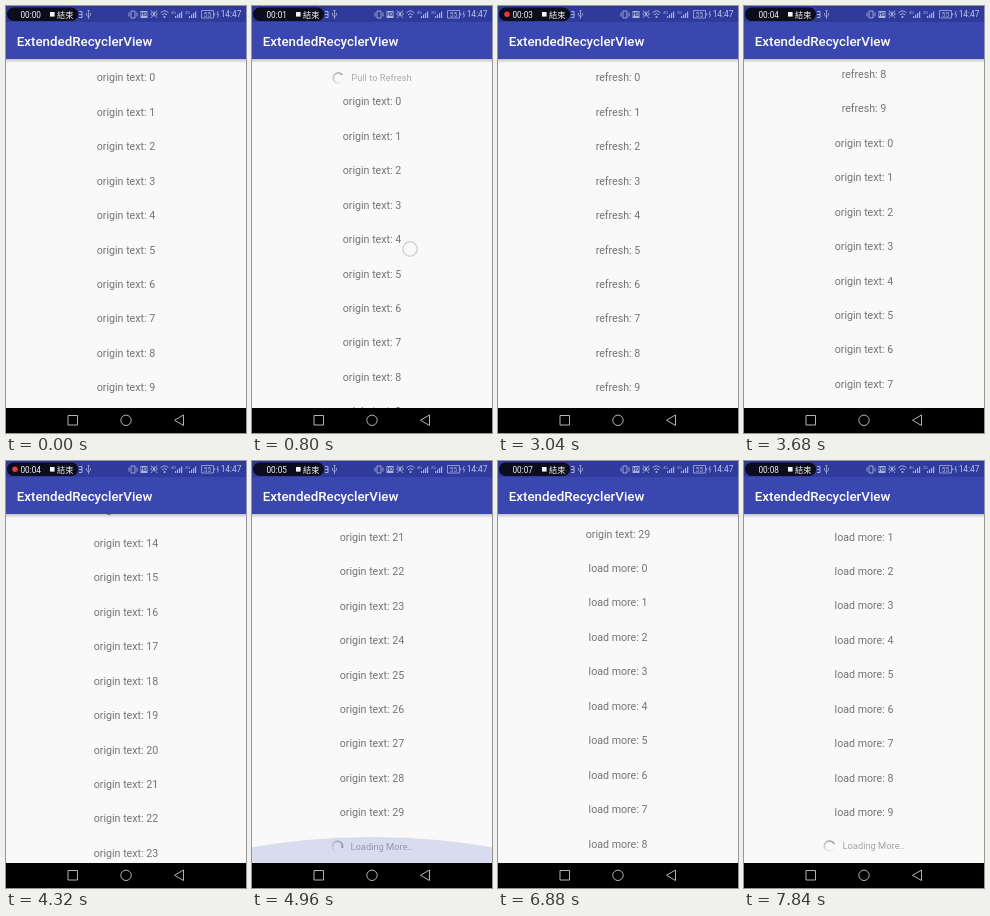
An HTML page with a canvas that plays this animation: 240x427 px, repeating every 8 s.

```html
<!DOCTYPE html>
<html lang="en">
<head>
<meta charset="utf-8">
<title>ExtendedRecyclerView</title>
<style>
  html, body { margin: 0; width: 100%; height: 100%; overflow: hidden; background: #f9f9f9; }
  canvas { display: block; width: 100vw; height: 100vh; }
</style>
</head>
<body>
<canvas></canvas>
<script>
const W = 240, H = 427, LOOP = 8000, STEP = 160;
const TOP = 71.5, PITCH = 34.44, LIST_TOP = 53, LIST_BOTTOM = 402;
const RELEASED = 1400, REFRESHED = 2560, LOADED = 6240;
const ICON = '#aab0dc';

// Time and y of the row "origin text: 0"
const scrollKeys = [
  [0, 71.5], [320, 72], [480, 78], [800, 95.5], [1120, 121], [1280, 121], [1440, 108],
  [2559, 108], [2560, 452.4], [2720, 424], [2880, 415.9], [3200, 415.9], [3360, 355],
  [3680, 137], [4000, -160], [4320, -400], [4640, -602], [4800, -647.3],
  [6400, -647.3], [6560, -720], [6880, -926], [7200, -991.9], [LOOP, -991.9]
];
const glowKeys = [
  [4640, 0], [4800, 0.9], [4960, 1], [5120, 0.75], [5440, 0],
  [7040, 0], [7200, 0.8], [7360, 0.7], [7680, 0], [LOOP, 0]
];

const canvas = document.querySelector('canvas');
const ctx = canvas.getContext('2d');

function sample(keys, t) {
  const i = keys.findIndex(key => key[0] > t);
  if (i <= 0) return keys[0][1];
  const [t0, a] = keys[i - 1], [t1, b] = keys[i];
  return a + (b - a) * (t - t0) / (t1 - t0);
}

function rect(x, y, w, h, color) {
  ctx.fillStyle = color;
  ctx.fillRect(x, y, w, h);
}

function text(string, x, y, size, color, align = 'left', weight = 400) {
  ctx.font = `${weight} ${size}px Roboto, "Noto Sans CJK TC", "Noto Sans CJK", sans-serif`;
  ctx.textAlign = align;
  ctx.fillStyle = color;
  ctx.fillText(string, x, y);
}

function disc(x, y, r, color) {
  ctx.fillStyle = color;
  ctx.beginPath();
  ctx.arc(x, y, r, 0, 7);
  ctx.fill();
}

function stroke(path, color, width = 1) {
  ctx.strokeStyle = color;
  ctx.lineWidth = width;
  ctx.stroke(new Path2D(path));
}

function ring(x, y, r, color, width) {
  ctx.strokeStyle = color;
  ctx.lineWidth = width;
  ctx.beginPath();
  ctx.arc(x, y, r, 0, 7);
  ctx.stroke();
}

function loader(label, y, t) {
  ctx.font = '400 9.33px Roboto, sans-serif';
  const left = W / 2 - (19 + ctx.measureText(label).width) / 2;
  const sweep = ctx.createConicGradient(t / 1000 * 2 * Math.PI + 0.6, left + 6, y);
  sweep.addColorStop(0, 'rgba(165,165,165,0)');
  sweep.addColorStop(0.25, 'rgba(165,165,165,.1)');
  sweep.addColorStop(1, 'rgba(165,165,165,1)');
  ring(left + 6, y, 5, sweep, 2);
  text(label, left + 19, y + 3.4, 9.33, '#a5a5a9');
}

function drawList(t) {
  rect(0, LIST_TOP, W, LIST_BOTTOM - LIST_TOP, '#f9f9f9');
  ctx.save();
  ctx.beginPath();
  ctx.rect(0, LIST_TOP, W, LIST_BOTTOM - LIST_TOP);
  ctx.clip();

  const origin = sample(scrollKeys, t);
  const pull = origin - TOP;
  if (t < REFRESHED && pull > 1) {
    const label = t >= RELEASED ? 'Refreshing..' : pull > 37 ? 'Release to Refresh' : 'Pull to Refresh';
    ctx.globalAlpha = Math.min(1, pull / 26);
    loader(label, 72, t);
    ctx.globalAlpha = 1;
  }

  const first = t >= REFRESHED ? -10 : 0;
  const last = t >= LOADED ? 39 : 29;
  for (let i = first; i <= last; i++) {
    const y = origin + i * PITCH;
    if (y < 40 || y > 415) continue;
    const label = i < 0 ? `refresh: ${i + 10}` : i < 30 ? `origin text: ${i}` : `load more: ${i - 30}`;
    text(label, W / 2, y + 3.8, 10.67, '#747474', 'center');
  }
  const footer = origin + last * PITCH + 33.7;
  if (footer < 415) loader('Loading More..', footer, t);

  const glow = sample(glowKeys, t);
  if (glow > 0) disc(W / 2, LIST_BOTTOM - 26 * glow + 700, 700, `rgba(63,81,181,${0.17 * glow})`);

  // Finger marker follows the pull at twice its distance
  if (t >= 320 && t < RELEASED) ring(158, 195 + pull * 2, 7.2, '#d3d3d7', 1.5);

  const shadow = ctx.createLinearGradient(0, LIST_TOP, 0, LIST_TOP + 4);
  shadow.addColorStop(0, 'rgba(0,0,0,.22)');
  shadow.addColorStop(1, 'rgba(0,0,0,0)');
  rect(0, LIST_TOP, W, 4, shadow);
  ctx.restore();
}

function signal(x, label) {
  text(label, x - 2, 7.5, 4, ICON);
  for (let i = 0; i < 4; i++) rect(x + 2 + i * 2, 10 - i * 1.5, 1.2, 2 + i * 1.5, ICON);
}

function drawStatus(t) {
  rect(0, 0, W, 16, '#2f3b9b');
  ctx.fillStyle = '#0b0c1c';
  ctx.beginPath();
  ctx.roundRect(1, 1.5, 71, 13.5, 6.5);
  ctx.fill();

  const clock = t + 460;
  if (clock % 1000 >= 500) disc(9, 8.3, 2.7, '#f0382c');
  text(`00:0${Math.floor(clock / 1000)}`, 14.5, 11.5, 8.2, '#f4f4f4');
  rect(44, 6, 4.6, 4.6, '#f4f4f4');
  text('結束', 51, 11.6, 8.2, '#f4f4f4');

  stroke('M73 5.5h3v6h-3M73 8.5h3', ICON);
  stroke('M82.5 4v9M80.5 7v2l2 2 2-2V7M81.5 5l1-1 1 1', ICON, 0.8);

  stroke('M125 5h4v7h-4zM123 6.5v4M131 6.5v4', ICON, 0.9);
  rect(134.5, 5, 7, 7, ICON);
  text('HD', 138, 10.4, 4.6, '#2f3b9b', 'center', 700);
  stroke('M144.5 8q3.5-4 7 0q-3.5 4-7 0M145 4.5l1 1.5M151 4.5l-1 1.5M145 12l1-1.5M151 12l-1-1.5', ICON, 0.9);
  disc(148, 8, 1.2, ICON);
  stroke('M154.5 6.8q4-3.8 8 0M156 8.8q2.5-2.4 5 0', ICON, 1);
  disc(158.5, 11, 1.1, ICON);
  signal(167, '4G');
  signal(181, '2G');
  stroke('M195.5 4.5h12v7.5h-12zM208.7 7v2.5', ICON, 0.8);
  text('55', 201.5, 10.8, 6.5, ICON, 'center');
  stroke('M212.2 5l-1.2 3.4h1.6l-1 3.2', ICON, 0.8);
  text('14:47', 235.5, 11.4, 8.4, '#c0c5e6', 'right');
}

function draw(t) {
  const width = Math.round(innerWidth * devicePixelRatio);
  const height = Math.round(innerHeight * devicePixelRatio);
  if (canvas.width !== width || canvas.height !== height) {
    canvas.width = width;
    canvas.height = height;
  }
  ctx.setTransform(width / W, 0, 0, height / H, 0, 0);

  drawList(t);
  rect(0, 16, W, LIST_TOP - 16, '#3a47b1');
  text('ExtendedRecyclerView', 10.7, 40, 13.33, '#fff', 'left', 500);
  drawStatus(t);

  rect(0, LIST_BOTTOM, W, H - LIST_BOTTOM, '#000');
  stroke('M62 409.5h9.5v9.5h-9.5z', '#b4b4b4');
  ring(120, 414.3, 5.2, '#b4b4b4', 1);
  stroke('M177.5 409v10.5l-9-5.25z', '#b4b4b4');
}

function frame() {
  const t = performance.now() % LOOP;
  draw(Math.floor(t / STEP) * STEP);
  requestAnimationFrame(frame);
}
frame();
</script>
</body>
</html>
```
